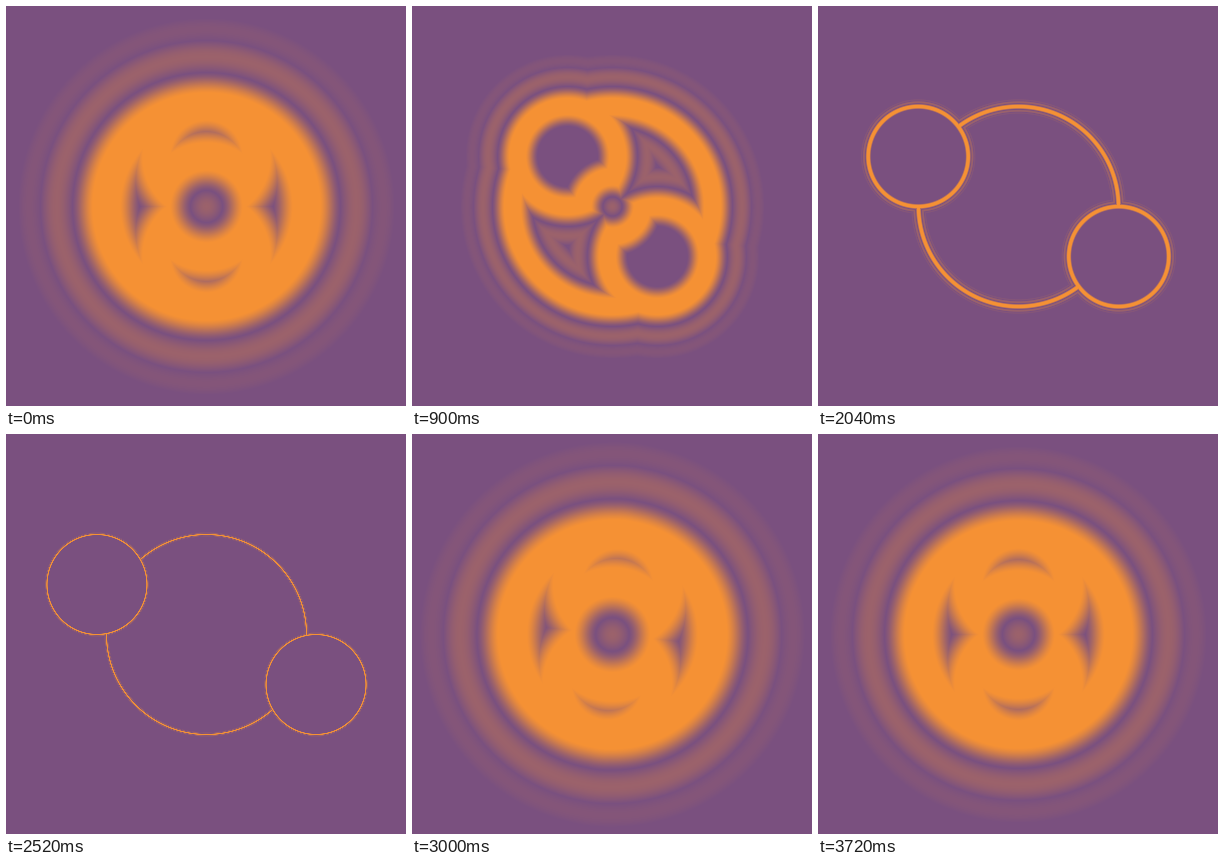
Recreate the animation shown at these times as an HTML page with a canvas. Size 400 px wide and 400 px high, loop 3.78 s.

```html
<!DOCTYPE html>
<html lang="en">
<head>
<meta charset="utf-8">
<title>Circle field</title>
<style>
  html, body { margin: 0; width: 100%; height: 100%; overflow: hidden; background: #7a507f; }
  canvas { display: block; width: 400px; height: 400px; }
</style>
</head>
<body>
<canvas id="stage" width="400" height="400"></canvas>
<script>
const SIZE = 400, MID = 200, LOOP = 3780, STEP = 60, PHASE = 35;
const BACK = [122, 80, 127], LINE = [245, 145, 52];
const RING = 100, DISC = 50, OVERSHOOT = 5;

const ctx = document.getElementById('stage').getContext('2d');
const image = ctx.createImageData(SIZE, SIZE);
const pixels = new Uint32Array(image.data.buffer);

// 256 blends from background to line colour
const palette = Uint32Array.from({ length: 256 }, (_, i) => {
  const [r, g, b] = BACK.map((c, k) => Math.round(c + (LINE[k] - c) * i / 255));
  return (255 << 24 | b << 16 | g << 8 | r) >>> 0;
});

// In-out ease with a wide overshoot at both ends
function backInOut(x) {
  const t = 1 - Math.abs(2 * x - 1);
  const dev = 0.5 * t ** 4 * (OVERSHOOT - (OVERSHOOT + 1) * t);
  return x < 0.5 ? -dev : 1 + dev;
}

// 0 at the closed pose, 1 at the open pose
function openness(ms) {
  const t = (ms + PHASE) % LOOP;
  return backInOut(Math.min(t, LOOP - t) / (LOOP / 2));
}

const lobe = (x, from, to, peak) => peak * Math.sin(Math.PI * (x - from) / (to - from));

// Brightness across the line: flat core, then two weaker bands outside only
function glow(x) {
  const a = Math.abs(x);
  if (a < 1) {
    const q = Math.min(1, (1 - a) / 0.6);
    return 0.5 * q + 0.5 * q * q * (3 - 2 * q);
  }
  if (x < 0 || x > 2.6) return 0;
  return x < 1.94 ? lobe(x, 1, 1.94, 0.27) : lobe(x, 1.94, 2.6, 0.08);
}

function draw(ms) {
  const u = openness(ms);
  const shift = 100 * u;
  const spread = 34 - 31 * u;
  const width = Math.max(0.9, spread);
  const hole = 1.47 * spread;

  for (let j = 0, n = 0; j < SIZE; j++) {
    const y = j - MID;
    for (let i = 0; i < SIZE; i++, n++) {
      const x = i - MID;
      const r = Math.sqrt(x * x + y * y);
      const x1 = x + shift, y1 = y + DISC, x2 = x - shift, y2 = y - DISC;
      const near = Math.sqrt(Math.min(x1 * x1 + y1 * y1, x2 * x2 + y2 * y2));
      const discs = Math.max(near - DISC, hole - r);
      const d = Math.min(Math.abs(r - RING), discs);
      pixels[n] = palette[Math.round(255 * glow(d / width))];
    }
  }
  ctx.putImageData(image, 0, 0);
}

const start = performance.now();
let shown = -1;

function tick() {
  const ms = (performance.now() - start) % LOOP;
  const step = Math.floor(ms / STEP);
  if (step !== shown) {
    shown = step;
    draw(step * STEP);
  }
  requestAnimationFrame(tick);
}
tick();
</script>
</body>
</html>
```
